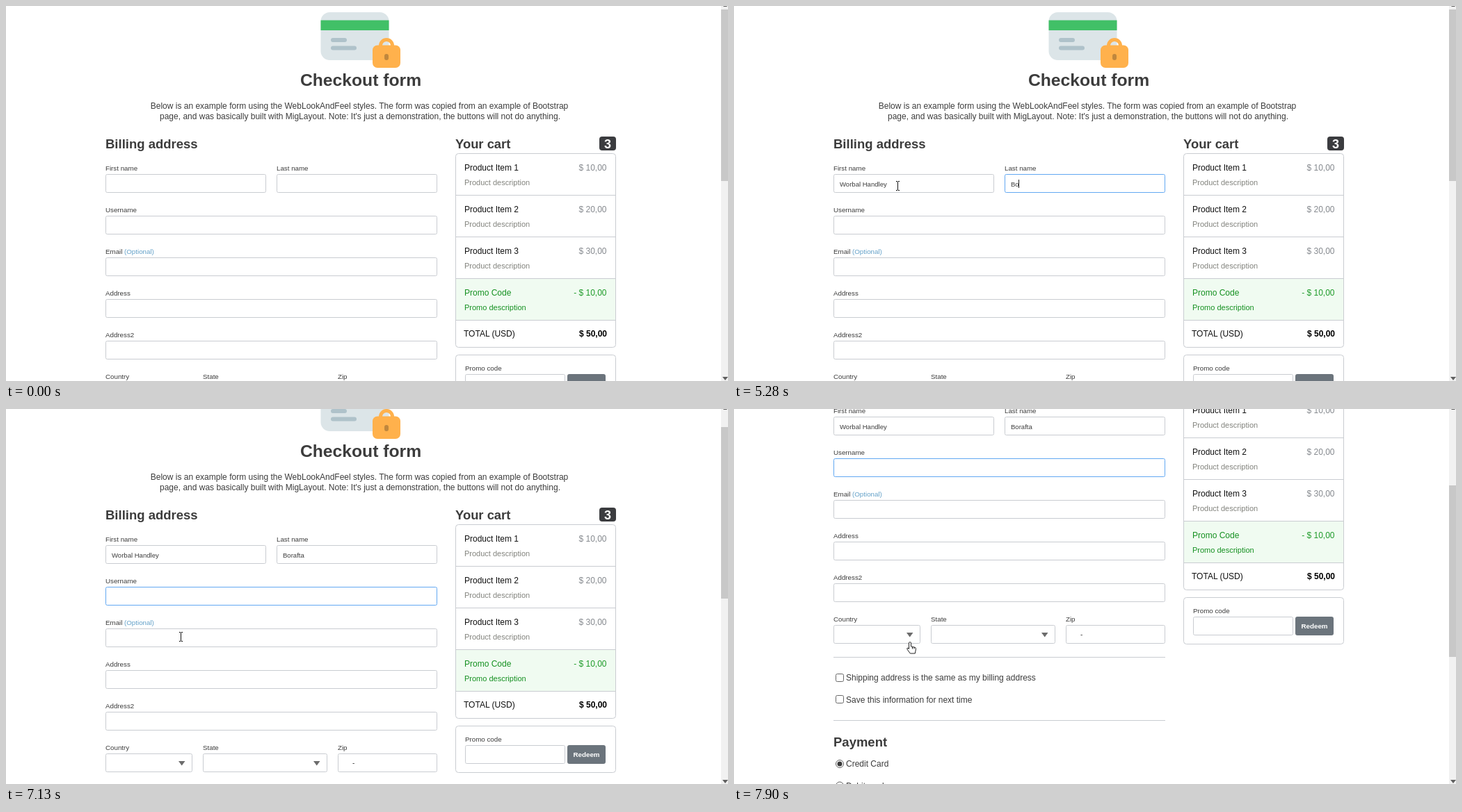
Write an HTML page that moves like this. It is 1038x540 px and loops after 8000 ms.

```html
<!DOCTYPE html>
<html lang="en">
<head>
<meta charset="utf-8">
<title>Checkout form</title>
<style>
  html, body { margin: 0; width: 100%; height: 100%; overflow: hidden; background: #fff; }
  svg { display: block; font: 12px "Liberation Sans", Arial, sans-serif; }
  text { white-space: pre; }
</style>
</head>
<body>
<svg id="stage" width="1038" height="540" viewBox="0 0 1038 540">
  <g id="page">
    <rect x="452.5" y="9" width="98" height="69" rx="13" fill="#dce5e8"/>
    <path d="M452.5 20.5h98v14.5h-98z" fill="#41c067"/>
    <path d="M470 49h17M470 60.5h31" stroke="#afc2ca" stroke-width="6" stroke-linecap="round"/>
    <path d="M538.5 59v-2a8.5 8.5 0 0 1 17 0v2" fill="none" stroke="#ffb14c" stroke-width="5"/>
    <rect x="527" y="56.5" width="40" height="32.5" rx="7" fill="#ffb14c"/>
    <rect x="544" y="69" width="6" height="9" rx="3" fill="#c0873d"/>
  </g>
  <path d="M1028 0h10v540h-10z" fill="#f1f1f1"/>
  <rect id="thumb" x="1028" y="5" width="10" height="247" fill="#c8c8c8"/>
  <path d="M1030 534h8l-4 5zM1031 1h6l-1-1h-4z" fill="#606060"/>
  <g id="pointers">
    <path id="beam" d="M-2 -5.5h2M1 -5.5h2M.5 -5v12M-2 7.5h2M1 7.5h2" fill="none" stroke="#111"/>
    <path id="arrow" d="M.5 .5v12.5l3 -2.8 2 4.3 2.2 -1 -2 -4.2h4z" fill="#fff" stroke="#222"/>
    <path id="hand" d="M-1.5 1.5q1.5 -2 3 0v5.5l5.5 1.2q1.8 .6 1.5 2.5l-1.2 6.3h-7l-4.3 -6q-.8 -2 1 -2l1.5 1.5z M3.5 7.5v3M6 8v2.5" fill="#fff" stroke="#222"/>
  </g>
</svg>
<script>
const LOOP = 8000, TICK = 76.7, BLINK = 470;
const INK = "#3c3c3c", LINE = "#c9ccd1", GREEN = "#149020";
const $ = id => document.getElementById(id);
const page = $("page");

function add(tag, attrs, content = "") {
  const node = document.createElementNS("http://www.w3.org/2000/svg", tag);
  for (const key in attrs) node.setAttribute(key, attrs[key]);
  node.textContent = content;
  return page.appendChild(node);
}
const text = (content, x, y, size = 12, fill = INK, extra = {}) =>
  add("text", { x, y, "font-size": size, fill, ...extra }, content);
const box = (x, y, right, bottom, rx = 2, fill = "#fff", stroke = LINE) =>
  add("rect", { x: x + .5, y: y + .5, width: right - x - 1, height: bottom - y - 1, rx, fill, stroke });
const rule = (x, y, right) => add("path", { d: `M${x} ${y + .5}H${right}`, stroke: LINE });
const bold = { "font-weight": "bold" };
const atRight = { "text-anchor": "end" };
const centered = { "text-anchor": "middle" };

// Areas that change the pointer shape
const areas = [];
function field(label, x, top, right, pointer = "beam") {
  text(label, x, top - 5, 9.75);
  areas.push({ x, top, right, pointer });
  return box(x, top, right, top + 27);
}
function select(label, x, top, right) {
  field(label, x, top, right, "hand");
  add("path", { d: `M${right - 20} ${top + 11}h9.5l-4.75 6.5z`, fill: "#6c6c6c" });
}

text("Checkout form", 510, 115, 24.7, INK, { ...bold, ...centered });
text("Below is an example form using the WebLookAndFeel styles. The form was copied from an example of Bootstrap", 508, 148, 12, INK, centered);
text("page, and was basically built with MigLayout. Note: It's just a demonstration, the buttons will not do anything.", 509, 163, 12, INK, centered);

text("Billing address", 143, 205, 18.5, INK, bold);
const inputs = [
  { node: field("First name", 143, 242, 374), x: 152, y: 260, focus: 770, value: "Worbal Handley",
    keys: [1700, 1770, 1940, 2170, 2250, 2400, 2630, 3100, 3410, 3500, 3730, 3960, 4035, 4110] },
  { node: field("Last name", 389, 242, 620), x: 398, y: 260, focus: 4420, value: "Borafta",
    keys: [5050, 5280, 5355, 5430, 5580, 5810, 5890] },
  { node: field("Username", 143, 302, 620), x: 152, y: 320, focus: 6200, value: "", keys: [] },
];
for (const input of inputs) input.label = text("", input.x, input.y, 9.55);

field("Email ", 143, 362, 620);
text("(Optional)", 170, 357, 9.75, "#62a0c8");
field("Address", 143, 422, 620);
field("Address2", 143, 482, 620);
select("Country", 143, 542, 268);
select("State", 283, 542, 462);
field("Zip", 477, 542, 620);
text("-", 498, 559, 10);
rule(143, 588, 620);

["Shipping address is the same as my billing address", "Save this information for next time"].forEach((label, i) => {
  const y = 618 + i * 31.5;
  add("rect", { x: 146.5, y: Math.floor(y) - 5.5, width: 11, height: 11, rx: 2, fill: "#fff", stroke: "#686868" });
  text(label, 161, y + 4);
});
rule(143, 679, 620);
text("Payment", 143, 717, 18.5, INK, bold);
["Credit Card", "Debit card"].forEach((label, i) => {
  const cy = 742 + i * 31.5;
  add("circle", { cx: 152, cy, r: 5.5, fill: "#fff", stroke: "#606060" });
  if (!i) add("circle", { cx: 152, cy, r: 3.5, fill: "#3a3a3a" });
  text(label, 161, cy + 4);
});

text("Your cart", 646, 205, 18.4, INK, bold);
add("rect", { x: 853, y: 188, width: 24, height: 20, rx: 4, fill: "#3b3c3f" });
text("3", 865, 204.5, 18, "#fff", { ...bold, ...centered });
box(646, 212, 877, 492, 4);
add("path", { d: "M647 393h229v59h-229z", fill: "#f0fbf1" });
for (let i = 0; i < 4; i++) {
  const y = 237 + i * 60, promo = i === 3;
  text(promo ? "Promo Code" : `Product Item ${i + 1}`, 659, y, 12, promo ? GREEN : "#111");
  text(promo ? "- $ 10,00" : `$ ${i + 1}0,00`, 863.5, y, 12, promo ? "#209c2b" : "#868a8f", atRight);
  text(promo ? "Promo description" : "Product description", 659, y + 21, 11, promo ? GREEN : "#82837d");
  rule(647, y + 35, 876);
}
text("TOTAL (USD)", 658, 476, 12, "#111");
text("$ 50,00", 864, 476, 12, "#000", { ...bold, ...atRight });

box(646, 502, 877, 570, 4);
field("Promo code", 660, 530, 804);
add("rect", { x: 807, y: 530, width: 55, height: 27, rx: 3, fill: "#6b747c" });
areas.push({ x: 807, top: 530, right: 862, pointer: "hand" });
text("Redeem", 834.5, 547, 9.8, "#fff", { ...bold, ...centered });

const caret = add("rect", { width: 1, height: 12, fill: "#222" });

// Pointer stops: time, x, y
const stops = [[70, 904, 509], [690, 235, 258], [6600, 235, 258], [6975, 251, 326],
  [7050, 251, 326], [7280, 251, 328], [7670, 251, 328], [7890, 253, 335], [LOOP, 253, 335]];
const scrollTimes = [7050, 7165, 7280, 7520, 7820];

function pointerAt(time) {
  const next = Math.max(1, stops.findIndex(stop => stop[0] >= time));
  const [t0, x0, y0] = stops[next - 1], [t1, x1, y1] = stops[next];
  const k = Math.max(0, (time - t0) / (t1 - t0));
  const eased = k * k * (3 - 2 * k);
  return [Math.round(x0 + (x1 - x0) * eased), Math.round(y0 + (y1 - y0) * eased)];
}

function drawInputs(t) {
  const active = inputs.filter(input => t >= input.focus).pop();
  for (const input of inputs) {
    const typed = input.keys.filter(key => key <= t).length;
    input.label.textContent = input.value.slice(0, typed);
    input.node.setAttribute("stroke", input === active ? "#62a8f2" : LINE);
    if (input === active) {
      const since = t - (typed ? input.keys[typed - 1] : input.focus);
      const width = typed ? input.label.getComputedTextLength() : 0;
      caret.setAttribute("x", input.x + Math.floor(width));
      caret.setAttribute("y", input.y - 10);
      caret.style.display = since % (2 * BLINK) < BLINK ? "" : "none";
    }
  }
  if (!active) caret.style.display = "none";
}

function draw() {
  const t = performance.now() % LOOP;
  const scroll = Math.round(scrollTimes.filter(time => time <= t).length * 46.15);
  page.setAttribute("transform", `translate(0 ${-scroll})`);
  $("thumb").setAttribute("y", 5 + Math.round(scroll * .4545));
  drawInputs(t);

  const [x, y] = pointerAt(Math.floor((t + 8) / TICK) * TICK);
  const over = areas.find(a => x >= a.x && x < a.right && y + scroll >= a.top && y + scroll < a.top + 27);
  const shape = over ? over.pointer : "arrow";
  const hidden = t < 70 || (t >= 770 && t < 920);
  $("pointers").setAttribute("transform", `translate(${x} ${y})`);
  for (const id of ["beam", "arrow", "hand"]) $(id).style.display = !hidden && id === shape ? "" : "none";
  requestAnimationFrame(draw);
}
draw();
</script>
</body>
</html>
```
